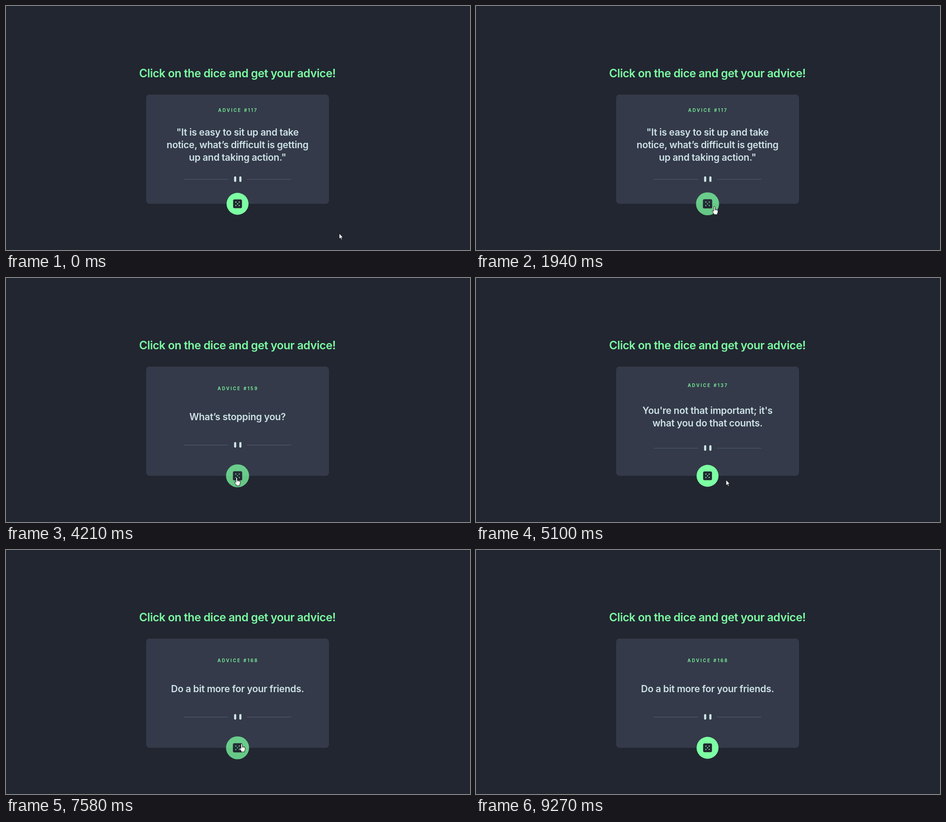
Animation of 1030 by 544 pixels, one loop 9.34 s. Source, as an HTML page:

```html
<!DOCTYPE html>
<html lang="en">
<head>
<meta charset="utf-8">
<title>Advice dice</title>
<style>
  html, body { margin: 0; width: 100%; height: 100%; overflow: hidden; background: #222631; }
  svg { display: block; width: 1030px; height: 544px; }
  text { font-family: Inter, "Open Sans", sans-serif; font-weight: 600; text-anchor: middle; }
  .title { font-size: 25px; letter-spacing: -.018em; fill: #7dffa3; }
  .label { font-size: 9.8px; letter-spacing: 2.6px; fill: #7dffa3; }
  .quote { font-size: 21px; letter-spacing: -.012em; fill: #cee3e9; }
  .hover { transform: scale(1.05); opacity: .75; }
  .dots { fill: none; stroke: #7dffa3; stroke-width: 2.5; stroke-linecap: round; }
  .pointer { fill: #fff; stroke: #000; stroke-width: .9; stroke-linejoin: round; }
</style>
</head>
<body>
<svg viewBox="0 0 1030 544">
  <rect width="1030" height="544" fill="#222631"/>
  <rect width="1030" height="1" fill="#1b1f28"/>
  <text class="title" x="513.7" y="158.5">Click on the dice and get your advice!</text>
  <rect x="311" y="197.5" width="406" height="243.5" rx="7.5" fill="#343a49"/>
  <text class="label" id="label" x="515"></text>
  <g id="lines"></g>
  <g id="divider">
    <path d="M394.5 .5H493.5M534.5 .5H633.5" stroke="#4f5d74"/>
    <path d="M508.7 -3.9V3.9M520.3 -3.9V3.9" stroke="#cee3e9" stroke-width="4.8" stroke-linecap="round"/>
  </g>
  <g transform="translate(514 441)">
    <g id="dice">
      <circle r="24.4" fill="#7dffa3"/>
      <rect x="-9.8" y="-9.8" width="19.6" height="19.6" rx="3.2" fill="#222631"/>
      <path class="dots" d="M-3.7 -3.7h0M3.7 -3.7h0M0 0h0M-3.7 3.7h0M3.7 3.7h0"/>
    </g>
  </g>
  <g id="pointer" class="pointer">
    <path id="arrow" d="M0 0V12.6L2.9 9.9L4.8 14.4L6.8 13.6L4.9 9.3H8.6Z"/>
    <g id="hand">
      <path d="M-1.5 1.5a1.5 1.5 0 0 1 3 0V6L4 6.4L6.4 7Q8 7.5 8 9V12.5L6.8 15.5V18H-1V16L-4.6 11.2Q-5.4 9.6-4 9.2Q-2.8 9.2-1.5 11Z"/>
      <path d="M1.5 6V9M3.8 6.6V9.2M6 7.2V9.4" fill="none" stroke-width=".7"/>
    </g>
  </g>
</svg>
<script>
const LOOP = 9340, LINE_HEIGHT = 27.7;
const byId = id => document.getElementById(id);

const advices = [
  { at: 0, id: 117, lines: ['"It is easy to sit up and take', 'notice, what’s difficult is getting', 'up and taking action."'] },
  { at: 2140, id: 159, lines: ['What’s stopping you?'] },
  { at: 4760, id: 137, lines: ["You're not that important; it's", 'what you do that counts.'] },
  { at: 7580, id: 168, lines: ['Do a bit more for your friends.'] }
];

// The pointer visits the dice three times, rests beside it, then leaves the stage.
const start = { x: 740, y: 507 };
const moves = [
  { from: 0, to: 930, x: 522, y: 439 },
  { from: 1870, to: 1940, x: 529, y: 447 },
  { from: 1940, to: 2340, x: 558, y: 452 },
  { from: 2800, to: 3680, x: 515, y: 435 },
  { from: 4020, to: 4210, x: 512, y: 445 },
  { from: 4570, to: 5100, x: 555, y: 450 },
  { from: 6100, to: 6700, x: 522, y: 443 },
  { from: 6910, to: 7120, x: 523, y: 432 },
  { from: 8040, to: 8390, x: 564.5, y: 444.5 },
  { from: 8390, to: 8980, x: 869, y: 498 },
  { from: 8980, to: 9270, x: 985, y: 547 }
];

const easeOut = p => 1 - (1 - p) ** 1.4;
const mix = (a, b, p) => a + (b - a) * p;

function pointerAt(t) {
  return moves.filter(move => t >= move.from).reduce((pos, move) => {
    const p = easeOut(Math.min(1, (t - move.from) / (move.to - move.from)));
    return { x: mix(pos.x, move.x, p), y: mix(pos.y, move.y, p) };
  }, start);
}

let shown;
function showAdvice(advice) {
  if (advice === shown) return;
  shown = advice;
  const { id, lines } = advice, inset = (3 - lines.length) * 7;
  byId('label').textContent = `ADVICE #${id}`;
  byId('label').setAttribute('y', 236 + inset);
  byId('divider').setAttribute('transform', `translate(0 ${386 - inset})`);
  byId('lines').replaceChildren(...lines.map((line, i) => {
    const text = document.createElementNS('http://www.w3.org/2000/svg', 'text');
    text.setAttribute('class', 'quote');
    text.setAttribute('x', 514);
    text.setAttribute('y', 317 + (i - (lines.length - 1) / 2) * LINE_HEIGHT);
    text.textContent = line;
    return text;
  }));
}

function draw(t) {
  showAdvice(advices.findLast(advice => t >= advice.at));
  const { x, y } = pointerAt(t);
  const hover = Math.hypot(x - 514, y - 441) < 25;
  byId('pointer').setAttribute('transform', `translate(${x} ${y})`);
  byId('arrow').style.display = hover ? 'none' : '';
  byId('hand').style.display = hover ? '' : 'none';
  byId('dice').classList.toggle('hover', hover);
}

const begin = performance.now();
function tick() {
  draw((performance.now() - begin) % LOOP);
  requestAnimationFrame(tick);
}
tick();
</script>
</body>
</html>
```
